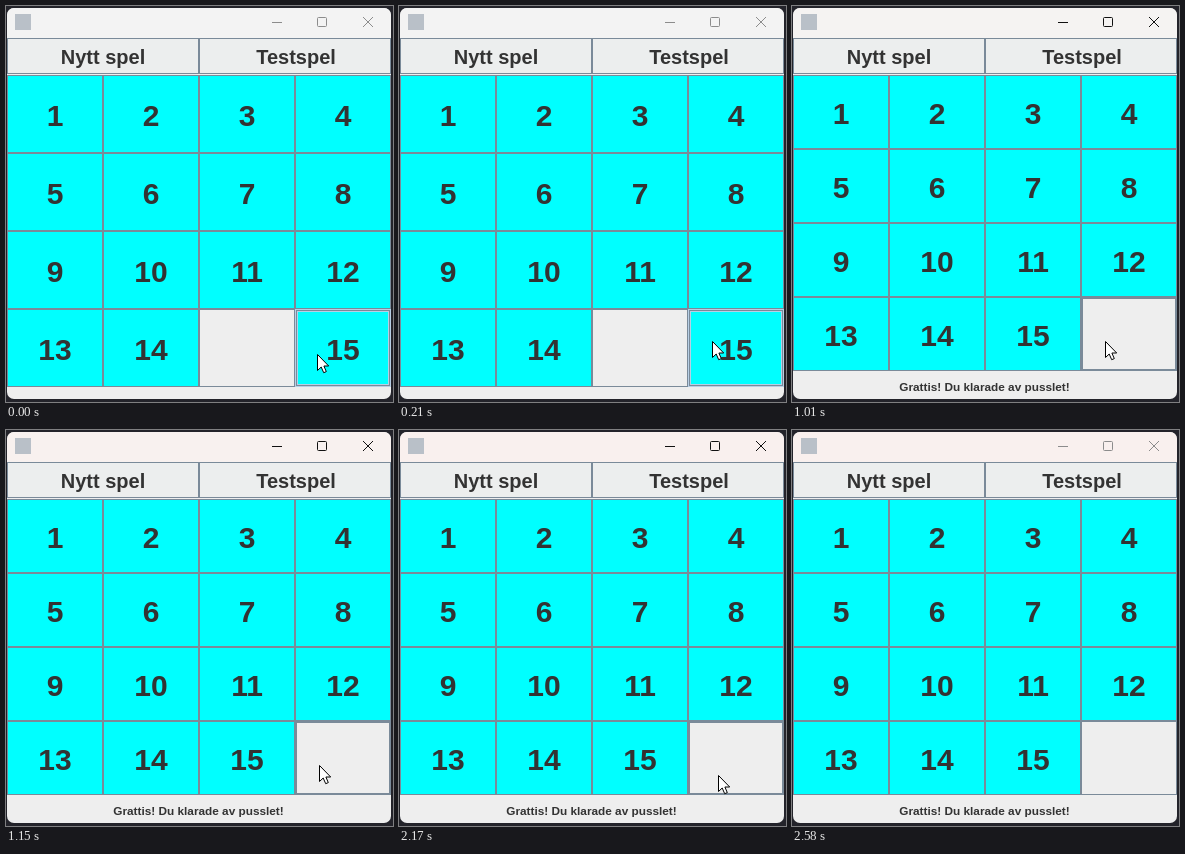
Animation of 387x396 px, one loop 2650 ms. Source, as an HTML page with a canvas:

```html
<!DOCTYPE html>
<html lang="sv">
<head>
<meta charset="utf-8">
<title>Femtonspel</title>
<style>
  html, body { margin: 0; width: 100%; height: 100%; overflow: hidden; background: #23232a; }
  canvas { display: block; }
</style>
</head>
<body>
<canvas id="stage" width="387" height="396"></canvas>
<script>
const ctx = document.getElementById('stage').getContext('2d');
const LOOP = 2650, PRESS = 940, SOLVED = 1010, BLUR = 2580;
const LINE = '#7a8a99', GLOW = '#b8cfe5', PANEL = '#eeeeee', INK = '#333333';

// [start time, x, y]; the pointer leaves the stage at the last step
const pointerSteps = [
  [0, 311, 348], [70, 312, 343], [140, 313, 338], [210, 313, 335],
  [2170, 319, 345], [2240, 328, 362], [2310, 338, 383], [2380, 400, 420]
];
const titleSteps = [
  [0, '#f3f3f3'], [PRESS, '#f5f3f2'], [1080, '#f6f2f1'], [1150, '#f8f1ef'], [1220, '#f9f0ee']
];
const stepAt = (steps, t) => steps.filter(([start]) => start <= t).pop();

function fill(color, x, y, w, h) {
  ctx.fillStyle = color;
  ctx.fillRect(x, y, w, h);
}

function frame(color, x, y, w, h, inset = 0) {
  ctx.strokeStyle = color;
  ctx.lineWidth = 1;
  ctx.strokeRect(x + inset + .5, y + inset + .5, w - 2 * inset - 1, h - 2 * inset - 1);
}

function label(text, x, baseline, size) {
  ctx.font = `bold ${size}px "Liberation Sans", Arial, sans-serif`;
  ctx.textAlign = 'center';
  ctx.fillStyle = INK;
  ctx.fillText(text, x, baseline);
}

function button(x, y, w, h, color, look = 'plain') {
  fill(color, x, y, w, h);
  const rings = { plain: [LINE], hover: [GLOW, LINE, GLOW], focus: [LINE, LINE] }[look];
  rings.forEach((ring, i) => frame(ring, x, y, w, h, i));
}

function titleBar(t) {
  fill(stepAt(titleSteps, t)[1], 1, 2, 384, 30);
  fill('#b9c0c8', 9, 8, 16, 16);
  const active = t >= PRESS && t < BLUR;
  ctx.strokeStyle = active ? '#111' : '#8c8c8c';
  ctx.lineWidth = 1;
  ctx.beginPath();
  ctx.moveTo(266, 16.5);
  ctx.lineTo(276, 16.5);
  ctx.roundRect(311.5, 11.5, 9, 9, 1);
  ctx.moveTo(357, 11);
  ctx.lineTo(367, 21);
  ctx.moveTo(367, 11);
  ctx.lineTo(357, 21);
  ctx.stroke();
}

function board(t) {
  const solved = t >= SOLVED;
  const gap = solved ? 15 : 14;
  const rowHeight = solved ? 74 : 78;
  const look = t >= BLUR ? 'plain' : t < PRESS ? 'hover' : 'focus';
  for (let i = 0; i < 16; i++) {
    const x = 1 + i % 4 * 96, y = 69 + Math.floor(i / 4) * rowHeight;
    const empty = i === gap;
    button(x, y, 96, rowHeight, empty ? PANEL : '#00ffff', i === 15 ? look : 'plain');
    if (!empty) label(i < gap ? i + 1 : i, x + 48, y + rowHeight / 2 + 12, 30);
  }
  if (t >= PRESS && !solved) frame(INK, 319, 322, 36, 41);
  if (solved) label('Grattis! Du klarade av pusslet!', 192.5, 385, 11.8);
}

function pointer(t) {
  const [, x, y] = stepAt(pointerSteps, t);
  if (t >= PRESS && t < SOLVED) {
    ctx.fillStyle = 'rgba(255,255,0,.5)';
    ctx.beginPath();
    ctx.arc(x, y + .5, 12, 0, 2 * Math.PI);
    ctx.fill();
  }
  ctx.save();
  ctx.translate(x + .5, y + .5);
  const arrow = new Path2D('M0 0V16L3.7 12.5 6.2 18.2 8.8 17.1 6.4 11.5H11.2Z');
  ctx.fillStyle = '#fff';
  ctx.strokeStyle = '#000';
  ctx.lineWidth = 1;
  ctx.fill(arrow);
  ctx.stroke(arrow);
  ctx.restore();
}

function draw(now) {
  const t = now % LOOP;
  fill('#23232a', 0, 0, 387, 396);
  ctx.save();
  ctx.beginPath();
  ctx.roundRect(1, 2, 384, 391, 7);
  ctx.clip();
  fill(PANEL, 1, 2, 384, 391);
  titleBar(t);
  ['Nytt spel', 'Testspel'].forEach((text, i) => {
    button(1 + 192 * i, 32, 192, 36, '#eceeee');
    label(text, 97 + 193 * i, 58, 20);
  });
  board(t);
  ctx.restore();
  pointer(t);
}

const start = performance.now();
function tick() {
  draw(performance.now() - start);
  requestAnimationFrame(tick);
}
tick();
</script>
</body>
</html>
```
